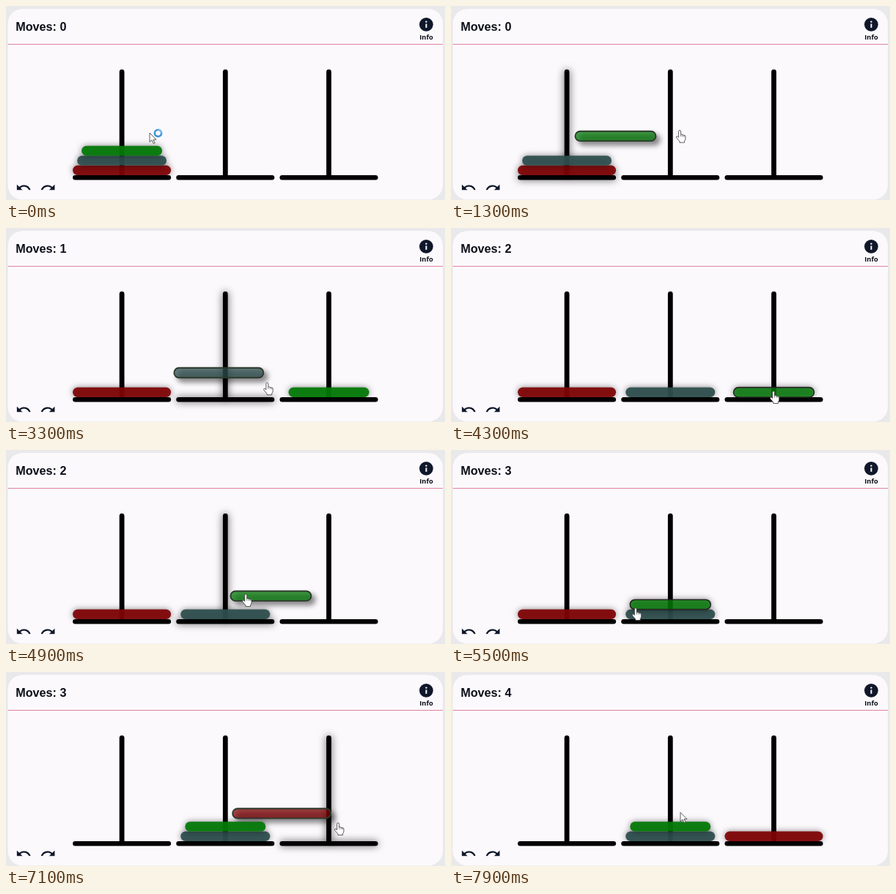
Recreate the animation shown at these times as an HTML page. Size 599 by 266 pixels, loop 8000 ms.

```html
<!DOCTYPE html>
<html lang="en">
<head>
<meta charset="utf-8">
<title>Tower puzzle</title>
<style>
  html, body { margin: 0; width: 100%; height: 100%; overflow: hidden; background: #e9e8ea; }
  svg { display: block; width: 599px; height: 266px; }
  .tower.over { filter: drop-shadow(0 0 5.5px rgba(0, 0, 0, .65)); }
  .disc { fill-opacity: .94; filter: drop-shadow(0 0 4px rgba(0, 0, 0, .5)); }
  .disc.hover { fill-opacity: .84; stroke: #242624; stroke-width: 1.6; }
  .disc.drag { fill-opacity: .74; stroke: #2b3a2b; stroke-width: 1.9; filter: drop-shadow(5px 5px 3.5px rgba(0, 0, 0, .6)); }
</style>
</head>
<body>
<svg viewBox="0 0 599 266">
  <clipPath id="toolbar"><rect y="240" width="100" height="12.3"/></clipPath>
  <rect width="599" height="266" fill="#e9e8ea"/>
  <rect id="edge" width="1.4" height="266" fill="#f6f3bd"/>
  <rect x="2.5" y="4" width="593.5" height="261.5" rx="20" fill="#fcf9fd"/>
  <path d="M2.5 52.5H596" stroke="#e0829c"/>
  <text id="moves" x="13.2" y="34" font-family="'Liberation Sans', Arial, sans-serif" font-size="16.2" font-weight="700" fill="#0c0f18"></text>
  <circle cx="573.4" cy="25.3" r="9.4" fill="#0f172a"/>
  <path d="M573.4 24.4V29.8" stroke="#fcf9fd" stroke-width="2"/>
  <circle cx="573.4" cy="21.6" r="1.2" fill="#fcf9fd"/>
  <text x="573.5" y="45.8" text-anchor="middle" font-family="'Open Sans', 'Noto Sans', sans-serif" font-size="9.3" font-weight="700" fill="#0c0f18">Info</text>
  <g fill="#0f172a" clip-path="url(#toolbar)">
    <path id="undo" transform="translate(13 238.2) scale(.92)" d="M12.5 8c-2.65 0-5.05.99-6.9 2.6L2 7v9h9l-3.62-3.62c1.39-1.16 3.16-1.88 5.12-1.88 3.54 0 6.55 2.31 7.6 5.5l2.37-.78C21.08 11.03 17.15 8 12.5 8z"/>
    <use href="#undo" transform="translate(81.3 0) scale(-1 1)"/>
  </g>
  <g id="towers"></g>
  <g id="discs"></g>
  <g id="cursor" stroke="#333" stroke-width=".8" stroke-linejoin="round" fill="#fff">
    <path id="arrow" d="M0 0V12.5L3 9.8L5.3 14.6L7.2 13.7L5 9.2H9Z"/>
    <g id="hand">
      <path d="M-1.5 9.5V1.2Q-1.5-.2 0-.2T1.5 1.2V6Q2 5.2 3 5.4T4 6.4Q5 5.8 6 6.6Q7.4 6.2 7.8 7.8V11Q7.8 13 6.4 14.5V16.5H-.2V15L-4 10.5Q-5.2 8.8-4.2 8T-1.5 9.5Z"/>
      <path d="M1.5 6V8.5M4 6.4V8.8M6 6.8V9" fill="none" stroke-width=".6"/>
    </g>
    <g id="spinner" fill="none" stroke-width="2.6">
      <circle cx="11.5" cy=".3" r="4.6" stroke="#3c95d6"/>
      <path d="M11.5-4.3A4.6 4.6 0 0 1 16.1.3" stroke="#79bdea"/>
    </g>
  </g>
</svg>
<script>
const LOOP = 8000, STEP = 100, LAG = 85;
const PEG = 158.1, GAP = 141.2, FLOOR = 225.3, THICK = 13.4;
const $ = id => document.getElementById(id);
const pegX = peg => PEG + GAP * peg;

function add(parent, tag, attrs) {
  const el = document.createElementNS('http://www.w3.org/2000/svg', tag);
  for (const key in attrs) el.setAttribute(key, attrs[key]);
  return parent.appendChild(el);
}

const towers = [0, 1, 2].map(peg => {
  const g = add($('towers'), 'g', { class: 'tower' });
  add(g, 'rect', { x: pegX(peg) - 3.4, y: 87, width: 6.8, height: 149, rx: 3.4 });
  add(g, 'rect', { x: pegX(peg) - 67, y: 232, width: 134, height: 6.6, rx: 3.3 });
  return g;
});

// Largest disc first
const discs = ['#800507', '#2f4f4f', '#047a08'].map((fill, i) => {
  const width = 134 - 12 * i;
  return { width, el: add($('discs'), 'rect', { fill, width, height: THICK, rx: THICK / 2 }) };
});

const point = (x, y) => ({ x, y });
const enter = point(196, 174), leave = point(313, 192.5);
const drags = [
  { disc: 2, to: 2, start: 1000, end: 1900, grab: point(196, 199), drop: point(491, 212) },
  { disc: 1, to: 1, start: 2800, end: 3600, grab: point(198, 217), drop: point(369, 217) },
  { disc: 2, to: 1, start: 4500, end: 5400, grab: point(440, 224), drop: point(254, 216) },
  { disc: 0, to: 2, start: 6600, end: 7400, grab: point(192, 226), drop: point(474, 214) }
];

// Eased arc; bend is its height relative to the horizontal distance
function glide(a, b, start, end, bend, t) {
  const p = Math.max(0, Math.min(1, (t - start) / (end - start)));
  const k = p * p * (3 - 2 * p);
  return point(
    a.x + (b.x - a.x) * k,
    a.y + (b.y - a.y) * k + bend * Math.abs(b.x - a.x) * Math.sin(Math.PI * k)
  );
}

// Carries rise, returns sag; both rest shortly before the next action
function pointer(t) {
  let from = enter, since = 0;
  for (const { grab, drop, start, end } of drags) {
    if (t <= start) return glide(from, grab, since, start - 300, .09, t);
    if (t < end) return glide(grab, drop, start, end - 200, -.12, t);
    from = drop;
    since = end;
  }
  return glide(from, leave, since, LOOP - 200, .09, t);
}

function layout(moves) {
  const stacks = [[0, 1, 2], [], []];
  for (const { disc, to } of moves) {
    stacks.find(s => s.includes(disc)).pop();
    stacks[to].push(disc);
  }
  return stacks;
}

const show = (id, on) => $(id).setAttribute('display', on ? 'inline' : 'none');

function render(t) {
  const done = drags.filter(d => d.end <= t);
  const drag = drags.find(d => d.start < t && t < d.end);
  const cursor = pointer(t);
  let over = -1, hand = Boolean(drag);

  layout(done).forEach((stack, peg) => stack.forEach((id, level) => {
    const { el, width } = discs[id];
    let x = pegX(peg), y = FLOOR - level * THICK, state = '';
    if (drag && drag.disc === id) {
      // The held disc trails the pointer
      const held = pointer(Math.max(drag.start, t - LAG));
      x += held.x - drag.grab.x;
      y += held.y - drag.grab.y;
      state = 'drag';
      over = Math.max(0, Math.min(2, Math.round((x - PEG) / GAP)));
    } else if (!drag && level === stack.length - 1 &&
        Math.abs(cursor.x - x) < width / 2 && Math.abs(cursor.y - y) < THICK / 2) {
      state = 'hover';
      hand = true;
    }
    el.setAttribute('class', 'disc ' + state);
    el.setAttribute('x', x - width / 2);
    el.setAttribute('y', y - THICK / 2);
  }));

  towers.forEach((g, i) => g.setAttribute('class', i === over ? 'tower over' : 'tower'));
  $('moves').textContent = 'Moves: ' + done.length;
  $('cursor').setAttribute('transform', `translate(${cursor.x} ${cursor.y})`);
  show('hand', hand);
  show('arrow', !hand);
  show('spinner', !hand && done.length < 2);
  show('edge', t >= 7200);
}

const begin = performance.now();
function tick() {
  const t = (performance.now() - begin) % LOOP;
  render(Math.floor(t / STEP) * STEP);
  requestAnimationFrame(tick);
}
tick();
</script>
</body>
</html>
```
